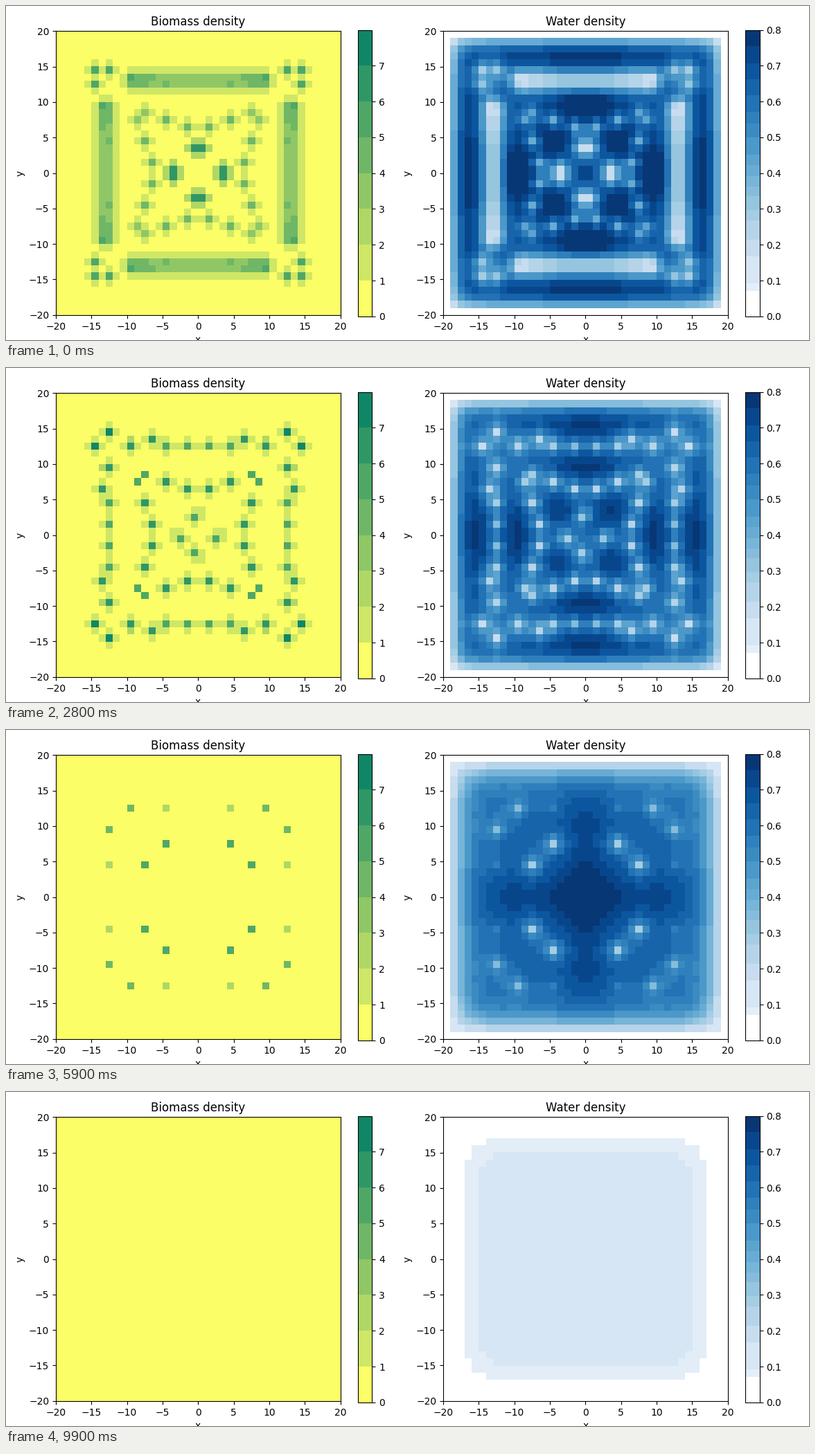
A matplotlib script for the animation above (10000 ms loop, 1159x483 px).

```python
import numpy as np
import matplotlib.pyplot as plt
from matplotlib.animation import FuncAnimation
from matplotlib.colors import BoundaryNorm, ListedColormap

W, H, DPI = 1159, 483, 100
N = 40               # cells per side
HALF = N // 2
STEPS = 100
SPREAD = 9.0         # water diffusion

# Plant clumps in one octant: row, column, peak density, time of death.
CLUMPS = [
    (14, 14, 7.4, 1.7), (14, 12, 7.2, 4.6), (13, 6, 6.2, 4.6),
    (12, 9, 6.8, 6.4), (12, 4, 5.6, 6.1), (12, 1, 5.0, 5.9),
    (8, 7, 5.5, 4.6), (7, 4, 6.8, 6.7), (6, 1, 6.4, 5.6),
]
BELT = [(p, q) for p in (12, 13) for q in range(10)]


def fade(t, death):
    return np.sqrt(np.clip((death - t) / 1.2, 0, 1))


def belt_gap(p, q):
    """Steps from a belt cell to the nearest clump in the belt."""
    return min(abs(p - a) + min(abs(q - b), q + b + 1)
               for a, b, *_ in CLUMPS if 12 <= a <= 13)


def mirror(quad):
    quad = np.maximum(quad, quad.T)
    half = np.hstack([quad[:, ::-1], quad])
    return np.vstack([half[::-1], half])


def spread(plants, ratio):
    """Thin growth around each cell, weaker by ratio per step."""
    for _ in range(3):
        p = np.pad(plants, 1)
        near = np.maximum.reduce([p[:-2, 1:-1], p[2:, 1:-1],
                                  p[1:-1, :-2], p[1:-1, 2:]])
        plants = np.maximum(plants, ratio * near)
    return plants


def biomass(t):
    quad = np.zeros((HALF, HALF))
    # The belt breaks up first where it is far from a clump.
    for p, q in BELT:
        gap = belt_gap(p, q)
        if gap:
            decay = np.exp(-gap * (t / 2.9) ** 1.3)
            quad[p, q] = (3.5 + 2 * (q / 9) ** 4) * decay
    for p, q, peak, death in CLUMPS:
        quad[p, q] = peak * min(1, 0.72 + 0.15 * t) * fade(t, death)
    # Four central pairs move inwards, then shrink to one cell each.
    quad[3, 0] = max(0, 6.5 - 1.67 * t)
    quad[2, 0] = max(0, min(2 * t, 7.2 - 2 * t))
    plants = mirror(quad)
    for x, y in [(-1, 2), (2, -1), (-3, -1), (-1, -3)]:
        plants[y + HALF, x + HALF] = min(7.4, 2 * t) * fade(t, 5.5)
    return spread(plants, 0.36 * np.exp(-t / 4))


def rain(t):
    return np.interp(t, [0, 6.7, 6.9, 8.5, 9.9],
                     [2.06, 0.69, 0.688, 0.398, 0.1265])


def water(plants, supply):
    """Steady water level with dry borders, by conjugate gradients."""
    inner = plants[1:-1, 1:-1]
    diag = 1 + inner ** 2 + 4 * SPREAD

    def apply(w):
        p = np.pad(w, 1)
        around = p[:-2, 1:-1] + p[2:, 1:-1] + p[1:-1, :-2] + p[1:-1, 2:]
        return diag * w - SPREAD * around

    w = np.zeros_like(inner)
    r = np.full_like(inner, supply)
    z = r / diag
    d = z.copy()
    rz = (r * z).sum()
    for _ in range(150):
        q = apply(d)
        step = rz / (d * q).sum()
        w += step * d
        r -= step * q
        z = r / diag
        new = (r * z).sum()
        if new < 1e-10:
            break
        d = z + new / rz * d
        rz = new
    return np.pad(w, 1)


def state(i):
    t = i / 10
    plants = biomass(t)
    return plants, water(plants, rain(t))


def place(x0, y0, x1, y1):
    return fig.add_axes([x0 / W, 1 - y1 / H, (x1 - x0) / W, (y1 - y0) / H])


def panel(x, title, edges, colors, ticks, fmt):
    ax = place(x, 36.2, x + 410.6, 446.8)
    image = ax.imshow(np.zeros((N, N)), origin="lower", aspect="auto",
                      extent=(-20, 20, -20, 20), interpolation="nearest",
                      cmap=ListedColormap(colors),
                      norm=BoundaryNorm(edges, len(colors)))
    ax.set(title=title, xlabel="x", ylabel="y",
           xticks=range(-20, 21, 5), yticks=range(-20, 21, 5))
    bar = fig.colorbar(image, cax=place(x + 436, 34.5, x + 456.5, 448.8),
                       spacing="proportional", ticks=ticks, format=fmt)
    bar.minorticks_off()
    return image


fig = plt.figure(figsize=(W / DPI, H / DPI), dpi=DPI, facecolor="white")

greens = [plt.cm.summer_r((k + 0.5) / 8) for k in range(8)]
greens[0] = "#fbfe66"
levels = np.array([0, .071, .093, .168, .214, .268, .297, .335, .362, .391,
                   .422, .451, .5, .538, .572, .618, .662, .706, .754, .8])
blues = list(plt.cm.Blues((levels[:-1] + levels[1:]) / 1.6))
blues[0] = (1, 1, 1, 1)

plant_image = panel(71.9, "Biomass density", np.arange(9), greens,
                    range(8), "%d")
water_image = panel(631.0, "Water density", levels, blues,
                    np.arange(9) / 10, "%.1f")

states = [state(i) for i in range(STEPS)]


def draw(i):
    plants, wet = states[i]
    plant_image.set_data(plants)
    water_image.set_data(wet)
    return plant_image, water_image


anim = FuncAnimation(fig, draw, frames=STEPS, interval=100, repeat=True,
                     repeat_delay=0, blit=False)
plt.show()
```
